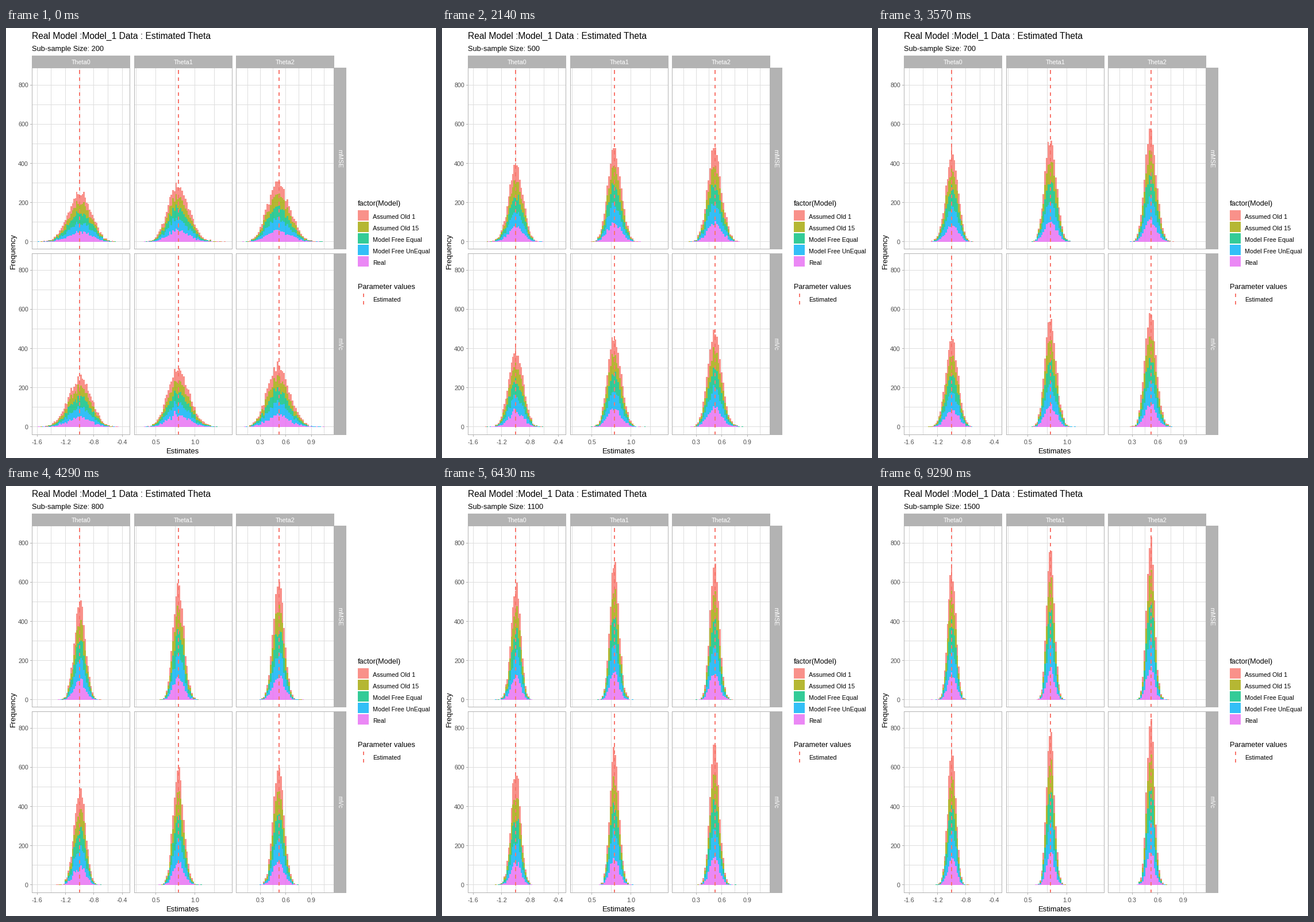
A matplotlib script for the animation above (10000 ms loop, 748 by 748 pixels).

```python
import numpy as np
import matplotlib.pyplot as plt
from collections import defaultdict
from matplotlib.animation import FuncAnimation
from matplotlib.collections import PolyCollection

SIDE, DPI = 748, 88
PT = 72 / DPI
plt.rcParams["font.family"] = "Liberation Sans"

LOOP, TICK = 10000, 50
SIZES = range(200, 1600, 100)
BIN = 0.02
PER_COUNT = 0.3406          # pixels per counted estimate
NOISE = 0.75
DASH = 6.36
GREY, GRID, INK, RED = "#B3B3B3", "#DEDEDE", "#4D4D4D", "#F8766D"
MODELS = [("Assumed Old 1", "#F8766D"), ("Assumed Old 15", "#A3A500"),
          ("Model Free Equal", "#00BF7D"), ("Model Free UnEqual", "#00B0F6"),
          ("Real", "#E76BF3")]

# px is where the value `at` stands; `step` separates labelled ticks
COLS = [
    dict(name="Theta0", left=45, px=128.2, at=-1.0, unit=123.4, mid=-0.997,
         sd=2.28, skew=-0.04, line=-1.0, first=-1.6, step=0.4),
    dict(name="Theta1", left=223, px=260.6, at=0.5, unit=136.0, mid=0.79,
         sd=1.945, skew=0.07, line=0.79, first=0.5, step=0.5),
    dict(name="Theta2", left=400, px=442.4, at=0.3, unit=148.4, mid=0.514,
         sd=1.855, skew=0.07, line=0.517, first=0.3, step=0.3),
]
ROWS = [dict(name="mMSE", top=69, base=372), dict(name="mVc", top=392, base=694)]
WIDE, TALL, PAD = 171, 316, 8

fig = plt.figure(figsize=(SIDE / DPI, SIDE / DPI), dpi=DPI, facecolor="white")
ax = fig.add_axes([0, 0, 1, 1])
ax.set_xlim(0, SIDE)
ax.set_ylim(SIDE, 0)
ax.axis("off")
boxes = defaultdict(list)


def box(x0, y0, x1, y1):
    return [(x0, y0), (x1, y0), (x1, y1), (x0, y1)]


def rect(x, y, w, h, color, z=1, alpha=1):
    boxes[color, z, alpha].append(box(x, y, x + w, y + h))


def add_fill(verts, color, z, alpha):
    fill = PolyCollection(verts, facecolors=color, edgecolors="none",
                          linewidths=0, alpha=alpha, antialiaseds=False, zorder=z)
    return ax.add_collection(fill, autolim=False)


def label(x, y, s, size, color="black", ha="left", va="baseline", rot=0):
    return ax.text(x, y, s, fontsize=size * PT, color=color, ha=ha, va=va,
                   rotation=rot, zorder=9)


def dashes(x, bottom, top):
    for y in np.arange(bottom, top, -2 * DASH):
        end = round(max(y - DASH, top))
        rect(x, end, 2, round(y) - end, RED, 5)


def to_px(col, value):
    return col["px"] + (value - col["at"]) * col["unit"]


def inner_range(col):
    """Values at the ends of a panel's data region."""
    ends = np.array([col["left"] + PAD, col["left"] + WIDE - PAD])
    return (ends - col["px"]) / col["unit"] + col["at"]


def ticks(col, step):
    lo, hi = inner_range(col) + np.array([-0.05, 0.05])
    first = col["first"] - col["step"]
    values = first + step * np.arange(12)
    return [v for v in values if lo < v < hi]


def draw_panel(col, row):
    left, top, base = col["left"], row["top"], row["base"]
    for v in ticks(col, col["step"] / 2):
        rect(int(to_px(col, v)), top, 1, TALL, GRID)
    for count in range(0, 900, 100):
        rect(left, int(base - 0.5 - count * PER_COUNT), WIDE, 1, GRID)
    dashes(round(to_px(col, col["line"])) - 1, top + TALL, top)
    for y in (top, top + TALL - 1):
        rect(left, y, WIDE, 1, GREY, 6)
    for x in (left, left + WIDE - 1):
        rect(x, top, 1, TALL, GREY, 6)


def draw_static():
    label(45, 19, "Real Model :Model_1 Data : Estimated Theta", 15.6)
    for col in COLS:
        rect(col["left"], 48, WIDE, 21, GREY)
        label(col["left"] + WIDE / 2, 63, col["name"], 10.7, "white", "center")
        for row in ROWS:
            draw_panel(col, row)
        for v in ticks(col, col["step"]):
            x = to_px(col, v)
            rect(int(x), 708, 1, 3, GREY)
            label(x, 724, f"{v:.1f}", 10.7, INK, "center")
    for row in ROWS:
        rect(571, row["top"], 21, TALL, GREY)
        label(580, row["top"] + TALL / 2, row["name"], 10.7, "white",
              "center", "center", 270)
        for count in range(0, 900, 200):
            y = row["base"] - 0.5 - count * PER_COUNT
            rect(42, int(y), 3, 1, GREY)
            label(39, y + 4.3, str(count), 10.7, INK, "right")
    label(308, 740, "Estimates", 13, ha="center")
    label(13, 388.5, "Frequency", 13, ha="center", va="center", rot=90)

    label(612, 309, "factor(Model)", 12.8)
    for i, (name, color) in enumerate(MODELS):
        y = 317 + 20 * i
        rect(612, y, 19, 18, color, alpha=0.8)
        label(638, y + 14.5, name, 10.7)
    label(612, 454, "Parameter values", 12.8)
    dashes(621, 481, 461)
    label(638, 475.5, "Estimated", 10.7)
    for (color, z, alpha), verts in boxes.items():
        add_fill(verts, color, z, alpha)


def bin_counts(col, n, rng):
    """Simulated counts per bin, one row per model; spread shrinks as 1/sqrt(n)."""
    lo, hi = inner_range(col)
    bins = np.arange(round(lo / BIN), round(hi / BIN) + 1)
    sd = col["sd"] / np.sqrt(n)
    skew = col["skew"] * np.sqrt(SIZES[0] / n)
    t = np.maximum(1 + skew * (bins * BIN - col["mid"]) / sd, 0.05)
    z = np.log(t) / skew
    mean = 1000 * BIN / (sd * np.sqrt(2 * np.pi)) * np.exp(-z * z / 2) / t
    draw = rng.poisson(mean, (len(MODELS), len(bins)))
    return bins, np.maximum(np.round(mean + NOISE * (draw - mean)), 0)


def stack_bars(n):
    """Bar outlines for each model, bottom layer first."""
    rng = np.random.default_rng(n)
    layers = [[] for _ in MODELS]
    for row in ROWS:
        for col in COLS:
            bins, counts = bin_counts(col, n, rng)
            total = np.cumsum(counts, axis=0)
            tops = np.maximum(np.round(total * PER_COUNT), total > 0)
            lows = np.vstack([np.zeros(len(bins)), tops[:-1]])
            x0 = np.round(to_px(col, (bins - 0.5) * BIN))
            x1 = np.round(to_px(col, (bins + 0.5) * BIN))
            for layer, low, top in zip(layers, lows, tops):
                layer += [box(a, row["base"] - lo, b, row["base"] - hi)
                          for a, b, lo, hi in zip(x0, x1, low, top) if hi > lo]
    return layers


draw_static()
subtitle = label(45, 40, "", 12.8)
bars = [stack_bars(n) for n in SIZES]
fills = [add_fill([], color, 3, 0.8) for _, color in reversed(MODELS)]


def update(i):
    # a sample size appears in the tick that contains its start time
    k = (TICK * (i + 1) - 1) * len(SIZES) // LOOP
    subtitle.set_text(f"Sub-sample Size: {SIZES[k]}")
    for fill, verts in zip(fills, bars[k]):
        fill.set_verts(verts)
    return [subtitle, *fills]


anim = FuncAnimation(fig, update, frames=LOOP // TICK, interval=TICK,
                     repeat=True, repeat_delay=0, blit=False)
plt.show()
```
